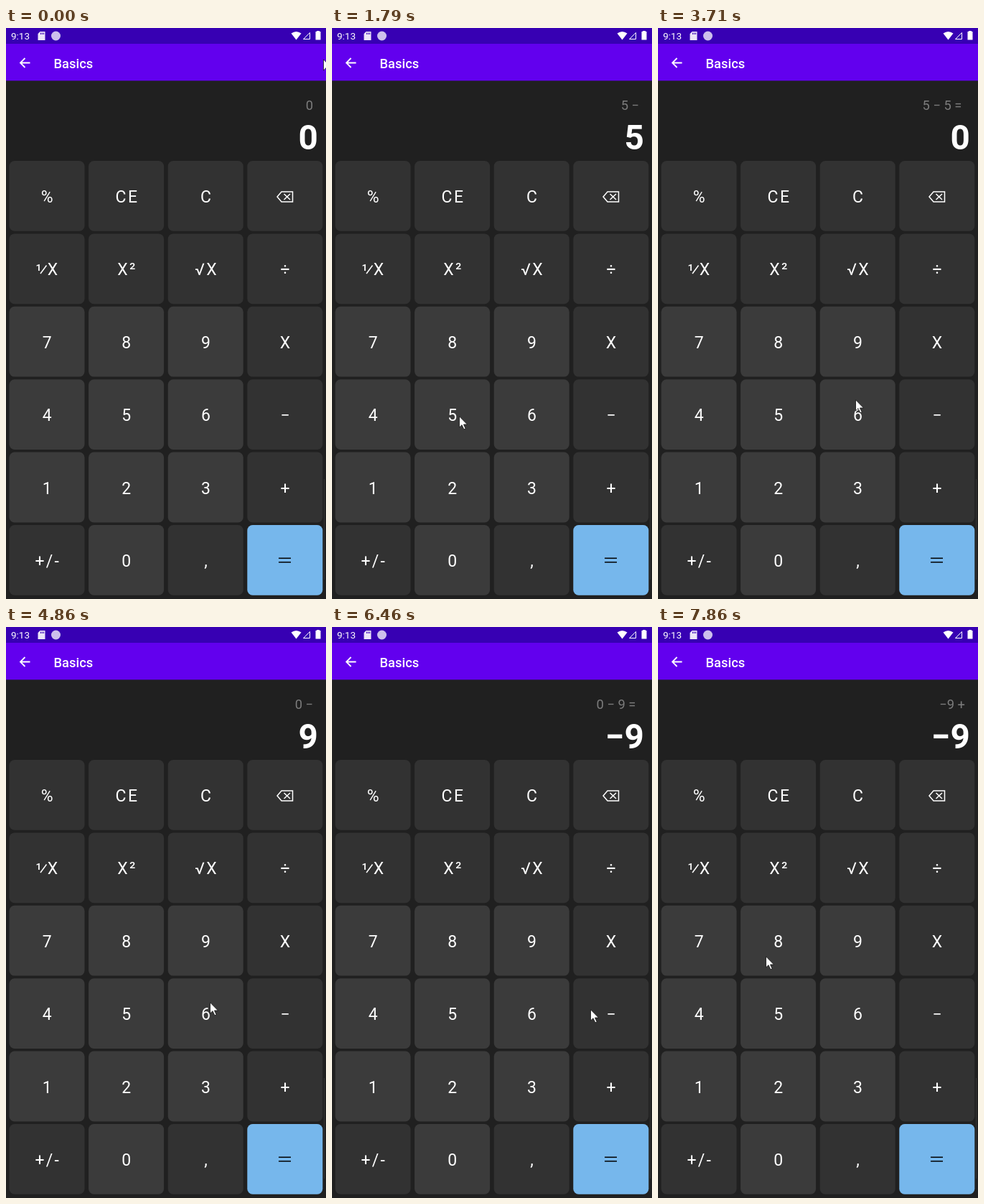
Recreate the animation shown at these times as an HTML page. Size 446 px wide and 795 px high, loop 8 s.

```html
<!DOCTYPE html>
<html lang="en">
<head>
<meta charset="utf-8">
<title>Calculator</title>
<style>
html, body { margin: 0; width: 100%; height: 100%; overflow: hidden; background: #202020; }
svg { display: block; width: 446px; height: 795px; font-family: Roboto, sans-serif; }
.key { font-size: 23px; letter-spacing: 2.3px; text-anchor: middle; fill: #fff; }
.line { fill: none; stroke: #fff; stroke-width: 1.5; }
.end { text-anchor: end; }
</style>
</head>
<body>
<svg viewBox="0 0 446 795">
  <rect width="446" height="795" fill="#202020"/>
  <rect y="22" width="446" height="51.4" fill="#6200ee"/>
  <rect width="446" height="22" fill="#3700b3"/>

  <g fill="#fff">
    <text x="7" y="16" font-size="13.5">9:13</text>
    <path d="M47.5 5H54.5V17H44.5V8Z" fill="#ece6f8"/>
    <path d="M48.5 6.500v2.500m2-2.500v2.500m2-2.500v2.500" stroke="#3700b3"/>
    <circle cx="69.500" cy="11" r="6.500" fill="#cdc0ec"/>
    <path d="M397.500 7.500Q404.500 2.500 411.500 7.500L404.500 16.500Z"/>
    <path class="line" style="stroke-width:1" d="M414.500 15.500H423.500V6.500Z"/>
    <path d="M433 5V4h4V5h1.500V16.500h-7V5Z"/>
    <text x="66.500" y="56" font-size="18.350" font-weight="500">Basics</text>
  </g>
  <path class="line" style="stroke-width:1.800" d="M33.500 48.500H20M26.500 42L20 48.500L26.500 55"/>

  <text id="expression" class="end" x="428" y="113.500" font-size="18.350" fill="#7c7c7c"></text>
  <text id="number" class="end" x="434.800" y="169" font-size="47.700" font-weight="700" fill="#fff"></text>

  <g id="keys"></g>
  <path class="line" style="stroke:#000" d="M380 738.200H397M380 743.800H397"/>
  <path class="line" d="M384 228H399.500V242H384L378 235ZM387.500 231L396 239M396 231L387.500 239"/>
  <path class="line" d="M48 342L56.500 330.500"/>
  <path d="M443.500 628V768" stroke="#343434"/>

  <path id="cursor" d="M.5 .8V16L4 12.700L6.900 18.800L9.200 17.800L6.500 12H11.500Z" fill="#fff" stroke="#111" stroke-width=".8"/>
</svg>
<script>
const LOOP = 8000;
const $ = id => document.getElementById(id);
const clamp = v => Math.max(0, Math.min(1, v));

// Empty labels belong to keys whose symbol is drawn as a path
const rows = [
  ['%', 'CE', 'C', ''],
  ['', 'X²', '√X', '÷'],
  ['7', '8', '9', 'X'],
  ['4', '5', '6', '−'],
  ['1', '2', '3', '+'],
  ['+/-', '0', ',', '']
];

const label = (text, x, y) => `<text class="key" x="${x + 1.15}" y="${y}">${text}</text>`;

const keyBox = (row, col, fill, id = '') => `<rect id="${id}" x="${4.5 + col * 110.6}"
  y="${185 + row * 101.4}" width="105" height="97.8" rx="7.5" fill="${fill}"/>`;

const keys = rows.flatMap((row, r) => row.map((text, c) =>
  keyBox(r, c, /\d$/.test(text) ? '#3b3b3b' : '#323232') +
  label(text, 57.2 + c * 110.6, 243 + r * 101.4)));

$('keys').innerHTML = keys.join('') + label('¹', 45.5, 345.5) + label('X', 65, 344.4) +
  keyBox(5, 3, '#76b7ec') + keyBox(5, 3, '#a6d0f2', 'glow');

// Pointer moves: start, end, x, y, and the key released as the move begins
const moves = [
  [30, 640, 170, 542],
  [790, 1150, 380, 555, '5'],
  [1390, 1790, 177, 540, '−'],
  [1960, 2380, 396, 754, '5'],
  [2460, 2820, 250, 691, '='],
  [3140, 3710, 274, 517],
  [3710, 4000, 393, 524],
  [4210, 4610, 249, 446, '−'],
  [4790, 5320, 390, 749, '9'],
  [5540, 5890, 314, 324, '='],
  [6210, 6800, 382, 635],
  [6860, 7040, 350, 585],
  [7040, 7140, 130, 454, '+'],
  [7140, 7300, 66, 440],
  [7300, 7800, 150, 458]
];

const show = n => String(n).replace('-', '−');

function tap(calc, key) {
  if (/\d/.test(key)) return { ...calc, value: +key };
  if (key === '=') {
    const { stored, op, value } = calc;
    return {
      value: op === '+' ? stored + value : stored - value,
      expression: `${calc.expression} ${show(value)} =\u00a0`
    };
  }
  return { value: calc.value, stored: calc.value, op: key, expression: `${show(calc.value)} ${key}` };
}

// The key lights up just before its release and then fades
const glow = (t, release) => t < release - 80 ? 0 : 1 - clamp((t - release) / 120);

function render(t) {
  let x = 442, y = 43, calc = { value: 0, expression: '0' }, light = 0;
  for (const [start, end, toX, toY, key] of moves) {
    if (key === '=') light = Math.max(light, glow(t, start));
    if (t < start) continue;
    const ease = 1 - (1 - clamp((t - start) / (end - start))) ** 2;
    x += (toX - x) * ease;
    y += (toY - y) * ease;
    if (key) calc = tap(calc, key);
  }
  $('expression').textContent = calc.expression;
  $('number').textContent = show(calc.value);
  $('glow').setAttribute('opacity', light);
  $('cursor').setAttribute('transform', `translate(${Math.round(x)} ${Math.round(y)})`);
}

const start = performance.now();
function tick() {
  render((performance.now() - start) % LOOP);
  requestAnimationFrame(tick);
}
tick();
</script>
</body>
</html>
```
